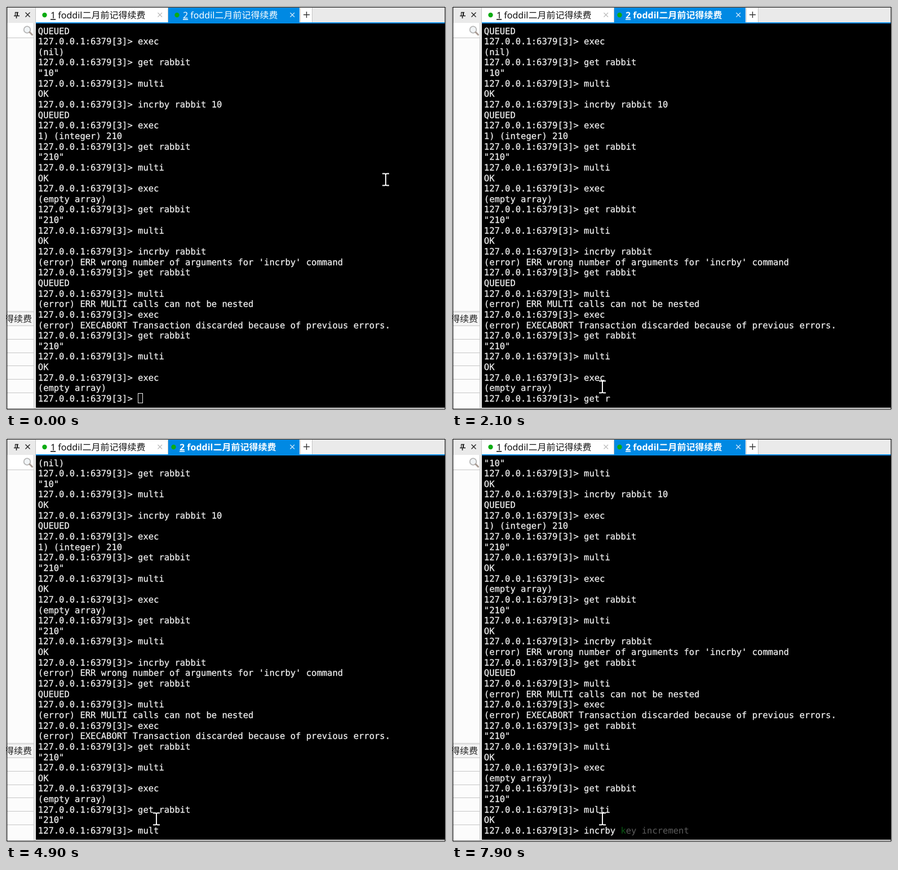
An HTML page for the animation above (8000 ms loop, 781 by 717 pixels).

```html
<!DOCTYPE html>
<html lang="zh-CN">
<head>
<meta charset="utf-8">
<title>Terminal transaction</title>
<style>
  html, body { margin: 0; width: 100%; height: 100%; overflow: hidden; background: #fff; }
  svg { display: block; width: 781px; height: 717px; }
  text { white-space: pre; text-rendering: geometricPrecision; }
  .ui { font: 16px "Noto Sans", "Noto Sans CJK SC", "Noto Sans CJK", sans-serif; }
  .key { text-decoration: underline; text-decoration-thickness: 1px; }
  .bold { font-weight: 700; }
  #term { font: 15.5px "DejaVu Sans Mono", monospace; fill: #f2f2f2; stroke: #f2f2f2; stroke-width: .25; }
  .line { fill: none; stroke-width: 1; }
</style>
</head>
<body>
<svg viewBox="0 0 781 717">
  <rect width="781" height="717" fill="#fff"/>

  <!-- side panel -->
  <rect x="2" y="3" width="50" height="27" fill="#eaeaea"/>
  <rect x="2" y="30" width="48" height="26" fill="#fff"/>
  <rect x="2" y="57" width="48" height="485" fill="#fcfcfc"/>
  <rect x="2" y="541" width="48" height="3" fill="#dedede"/>
  <rect x="0" y="544" width="50" height="23" fill="#f4f4f4"/>
  <rect x="2" y="568" width="48" height="146" fill="#fcfcfc"/>
  <rect x="50" y="30" width="3" height="685" fill="#eaeaea"/>
  <path id="rows" class="line" stroke="#c6c6c6"/>
  <g fill="none" stroke="#222">
    <path d="M16 11.5h6M14 17.5h10M18.500 18v4" stroke-width="1.5"/>
    <path d="M16.500 11v6M20.500 11v6" stroke-width="1.2"/>
    <path d="M20 11.500v6" stroke-width="2"/>
    <path d="M34.500 11.500l8 8M42.500 11.500l-8 8" stroke-width="1.4"/>
  </g>
  <circle cx="37.500" cy="42" r="5.800" fill="#f1f4f6" stroke="#b5b5b5" stroke-width="1.800"/>
  <path d="M42 46.500l4.500 4.500" stroke="#a99c94" stroke-width="3" stroke-linecap="round"/>

  <!-- tabs -->
  <rect x="53" y="3" width="726" height="26" fill="#eaeaea"/>
  <rect x="53" y="3" width="490" height="26" fill="#fff"/>
  <rect x="288" y="3" width="233" height="27" fill="#0089e3"/>
  <path class="line" d="M52.500 3v27M287.500 3v26M522.500 3v26M543.500 3v26" stroke="#c4c4c4"/>
  <rect x="53" y="29" width="726" height="2" fill="#0089e3"/>
  <path d="M269.500 12l7.500 7.500M277 12l-7.500 7.500" stroke="#b8b8b8" stroke-width="1.100"/>
  <path d="M504.500 12l7.500 7.500M512 12l-7.500 7.500" stroke="#e4f2fc" stroke-width="1.200"/>
  <path d="M528 15.500h11M533.500 10v11" stroke="#333" stroke-width="1.400"/>
  <g class="ui">
    <circle cx="68.500" cy="16" r="4.200" fill="#0cab12"/>
    <text x="79" y="22" fill="#111"><tspan class="key">1</tspan> foddil二月前记得续费</text>
    <g id="tab">
      <circle cx="-10.500" cy="16" r="4.200" fill="#0cab12"/>
      <text y="22" fill="#fff"><tspan class="key">2</tspan> foddil二月前记得续费</text>
    </g>
    <text x="-2" y="561" fill="#222">得续费</text>
  </g>

  <!-- terminal -->
  <rect x="53" y="31" width="726" height="682" fill="#000"/>
  <path class="line" d="M1.500 715.500V2H779.500V715.500Z" stroke="#222" style="stroke-width:1.500"/>
  <g id="term"></g>
  <rect id="caret"/>
  <path id="mouse" d="M-6 -10.500h4q2 0 2 2q0 -2 2 -2h4M0 -9.500v19M-6 10.500h4q2 0 2 -2q0 2 2 2h4"
        fill="none" stroke="#fff" stroke-width="1.900"/>
</svg>

<script>
const LOOP = 8000, ROWS = 36, LEFT = 56.8, BASE = 49.5, STEP = 18.643;
const PROMPT = '127.0.0.1:6379[3]> ';
const $ = id => document.getElementById(id);

// Lines starting with "$" carry the prompt.
const log = `QUEUED
$exec
(nil)
$get rabbit
"10"
$multi
OK
$incrby rabbit 10
QUEUED
$exec
1) (integer) 210
$get rabbit
"210"
$multi
OK
$exec
(empty array)
$get rabbit
"210"
$multi
OK
$incrby rabbit
(error) ERR wrong number of arguments for 'incrby' command
$get rabbit
QUEUED
$multi
(error) ERR MULTI calls can not be nested
$exec
(error) EXECABORT Transaction discarded because of previous errors.
$get rabbit
"210"
$multi
OK
$exec
(empty array)
$get rabbit
"210"
$multi
OK`.split('\n').map(s => s.replace('$', PROMPT));

// time, typed text, hint
const typing = [
  [0, ''], [1100, 'get ', 'key'],
  [2100, 'get r'], [2200, 'get ra'], [2300, 'get rab'], [2600, 'get rabb'],
  [2800, 'get rabbi'], [2900, 'get rabbit'],
  [3000, 'g'], [3200, 'm'], [3800, 'ml'], [4600, 'mu'], [4700, 'mul'], [4900, 'mult'],
  [5100, 'm'], [5600, 'i'], [6700, 'in'], [6800, 'inc'], [7100, 'incr', ' key'],
  [7600, 'incrb'], [7800, 'incrby', ' key increment'], [7900, 'incrby ', 'key increment']
];
const scroll = [[0, 0], [3000, 2], [5100, 4]];
const moves = [
  [0, 674, 308], [100, 440, 560], [200, 239, 711],
  [600, 243, 704], [700, 253, 690], [800, 263, 680], [900, 267, 676]
];
const FOCUS = 900;

const at = (steps, t) => steps.findLast(s => s[0] <= t);

function set(el, attrs) {
  for (const k in attrs) el.setAttribute(k, attrs[k]);
  return el;
}
function add(parent, name, attrs = {}) {
  return parent.appendChild(set(document.createElementNS('http://www.w3.org/2000/svg', name), attrs));
}

let grid = 'M49.5 30V714M2 56.5H50';
for (let i = 0; i < 6; i++) grid += `M2 ${Math.round(567 + i * 23.8) + .5}H50`;
$('rows').setAttribute('d', grid);

const lines = Array.from({ length: ROWS }, (_, i) =>
  add($('term'), 'text', { x: LEFT, y: BASE + i * STEP }));
const input = lines.pop();
const typed = add(input, 'tspan');
const under = add(input, 'tspan', { fill: '#0b5a14', stroke: 'none' });
const hint = add(input, 'tspan', { fill: '#5c5c5c', stroke: 'none' });

let last = '';
function draw(t) {
  const [, text, tip = ''] = at(typing, t);
  const [, top] = at(scroll, t);
  const [, mx, my] = at(moves, t);
  const focused = t >= FOCUS;
  const state = [text, tip, top, mx, my, focused].join('|');
  if (state === last) return;
  last = state;

  lines.forEach((el, i) => el.textContent = log[top + i]);
  const lit = tip.startsWith(' ') ? 0 : 1;
  typed.textContent = PROMPT + text;
  under.textContent = tip.slice(0, lit);
  hint.textContent = tip.slice(lit);

  set($('tab'), { transform: `translate(${focused ? 308 : 314} 0)`, class: focused ? 'bold' : '' });
  set($('mouse'), { transform: `translate(${mx} ${my})` });
  set($('caret'), focused
    ? { x: 234, y: 687, width: 9, height: 18, fill: '#00e000', stroke: 'none' }
    : { x: 234.5, y: 687.5, width: 8, height: 17, fill: 'none', stroke: '#f2f2f2' });
  $('caret').style.display = text ? 'none' : '';
}

const start = performance.now();
function tick() {
  draw((performance.now() - start) % LOOP);
  requestAnimationFrame(tick);
}
tick();
</script>
</body>
</html>
```
